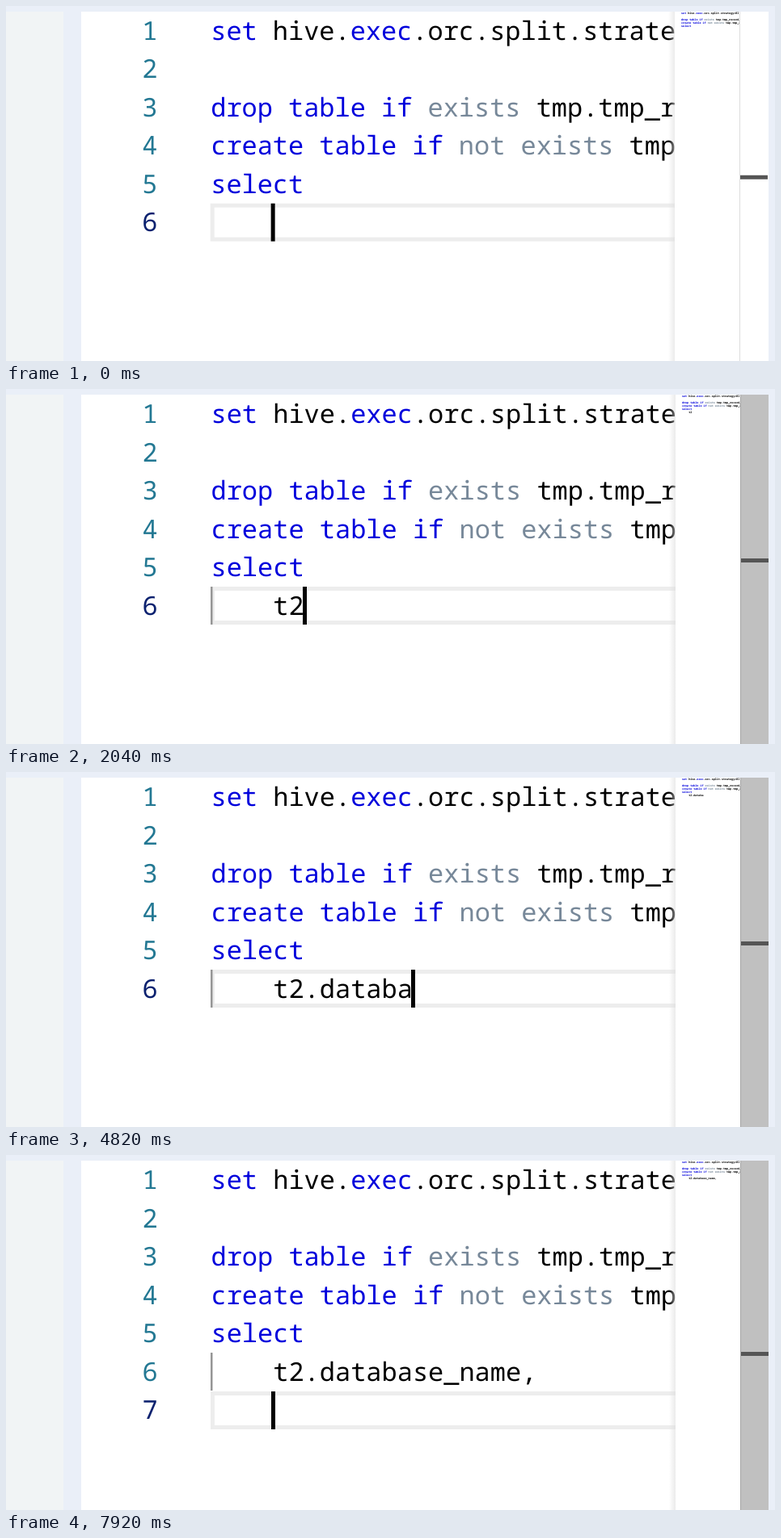
These frames come from a looping animation (951 px wide and 440 px high, 8 s). An HTML page:

```html
<!DOCTYPE html>
<html lang="en">
<head>
<meta charset="utf-8">
<title>SQL editor typing</title>
<style>
  html, body { margin: 0; width: 100%; height: 100%; overflow: hidden; background: #fff; }
  svg { display: block; width: 100%; height: 100%; }
  text { white-space: pre; text-rendering: geometricPrecision; font-family: "Noto Sans Mono", "DejaVu Sans Mono", monospace; }
  .icon { font-family: "Noto Sans", "Open Sans", sans-serif; }
</style>
</head>
<body>
<svg id="stage" viewBox="0 0 951 440" xmlns="http://www.w3.org/2000/svg"></svg>
<script>
const LOOP = 8000;
const CHAR = 19.19, SIZE = CHAR / 0.6, PITCH = 47.55;
const LEFT = 253.5, EDGE = 828;
const BLUE = "#0000dc", GREY = "#778899", INK = "#000";
const KEYWORDS = /^(set|exec|drop|table|if|create|select|database)$/;
const OPERATORS = /^(not|exists)$/;

const HEAD = [
  "set hive.exec.orc.split.strategy=BI;",
  "",
  "drop table if exists tmp.tmp_record_info;",
  "create table if not exists tmp.tmp_record_info as",
  "select"
];

// [time, typed characters, caret shown, popup]
const FULL = "t2.database_name,";
const STEPS = [
  [0, 0, 1], [490, 0, 0], [980, 0, 1],
  [1470, 1, 1, "t"], [1890, 2, 1, "t"], [2040, 2, 1], [2450, 2, 0],
  [2780, 3, 1], [3270, 3, 0],
  [3600, 4, 1, "d"], [3760, 5, 1], [3930, 6, 1], [4090, 7, 1], [4590, 7, 0],
  [4740, 8, 1], [4820, 9, 1], [5060, 10, 1], [5220, 11, 1], [5710, 11, 0],
  [5870, 12, 1], [6370, 12, 0],
  [6610, 13, 1], [6690, 14, 1], [6850, 15, 1], [7010, 16, 1], [7510, 16, 0],
  [7590, 17, 1], [7920, 17, 1]
];
const NEWLINE = 7920;
const POPUPS = {
  t: { col: 5, items: ["table", "tmp", "tmp_record_info"] },
  d: { col: 8, items: ["drop"] }
};
const BAR_FADE = [[0, "#ffffff", "#dcdcdc"], [130, "#ececec", "#cccccc"],
  [190, "#d8d8d8", "#b8b8b8"], [260, "#c5c5c5", "#acacac"], [490, "#c0c0c0", "#a6a6a6"]];

const at = (list, t) => list.filter(s => s[0] <= t).pop();
const rect = (x, y, w, h, fill, extra = "") =>
  `<rect x="${x}" y="${y}" width="${w}" height="${h}" fill="${fill}" ${extra}/>`;
const text = (x, y, size, body, extra = "") =>
  `<text x="${x}" y="${y}" font-size="${size}" ${extra}>${body}</text>`;
const paint = line => (line.match(/\w+|\W+/g) || []).map(word => {
  const fill = KEYWORDS.test(word) ? BLUE : OPERATORS.test(word) ? GREY : INK;
  return `<tspan fill="${fill}">${word}</tspan>`;
}).join("");
const lineTop = row => Math.round(245 + (row - 5) * PITCH);

function popup(key) {
  const { col, items } = POPUPS[key];
  const x = Math.round(LEFT + col * CHAR + 2), h = 48;
  const rows = items.map((item, i) => {
    const y = 294 + i * h, picked = i === 0;
    const match = `<tspan font-weight="bold" fill="${picked ? "#bbe7ff" : "#0066bf"}">${item[0]}</tspan>`;
    const fill = `fill="${picked ? "#fff" : "#333"}"`;
    return (picked ? rect(x + 1, y, 951 - x, h, "#0060c0") : "") +
      text(x + 8, y + 32, 24, "abc", `class="icon" letter-spacing="-1.2" ${fill}`) +
      text(x + 55.5, y + 35, SIZE, match + item.slice(1), fill);
  });
  return rect(x, 293, 960 - x, items.length * h + 3, "#c3cad2") +
    rect(x + 1, 294, 960 - x, items.length * h, "#f3f3f3") + rows.join("");
}

function draw(t) {
  const [, typed, caret, menu] = at(STEPS, t);
  const [, bar, barEdge] = at(BAR_FADE, t);
  const lines = [...HEAD, "    " + FULL.slice(0, typed)];
  const broke = t >= NEWLINE;
  if (broke) lines.push("    ");
  const active = lines.length - 1, top = lineTop(active);
  const caretX = Math.round(LEFT + lines[active].length * CHAR - 2);

  const numbers = lines.map((_, i) =>
    text(168.5, 42 + i * PITCH, SIZE, i + 1, `fill="${i === active ? "#0b216f" : "#237893"}"`)).join("");
  const code = lines.map((s, i) => text(LEFT, 42 + i * PITCH, SIZE, paint(s))).join("");
  const mini = lines.map((s, i) =>
    text(836, 10.4 + i * 3.95, 3.4, paint(s), 'font-weight="bold"')).join("");
  const box = rect(255.5, top + 2.5, 600, 42, "none", 'stroke="#ededed" stroke-width="5"');
  const guide = typed ? rect(253, 245, 2.5, 47, "#969696") : "";
  // the view settles from a very slight zoom-out
  const zoom = t < 130 ? 'transform="scale(.9989)"' : "";

  return rect(0, 0, 951, 440, "#eaeff8") + rect(0, 7, 71, 440, "#f1f4f5") +
    rect(93, 7, 850, 433, "#fff") +
    `<g ${zoom}>${numbers}<g clip-path="url(#codeClip)">${box}${guide}${code}` +
    (caret ? rect(caretX, top, 5, 47, "#000") : "") + "</g>" +
    rect(820, 7, 8, 434, "url(#shade)") + rect(828, 7, 80, 434, "#fff") +
    `<g clip-path="url(#miniClip)">${mini}</g>` +
    rect(908, 7, 35, 434, bar) + rect(908, 7, 1, 434, barEdge) +
    rect(909, broke ? 244 : 210, 34, 5, "#555") + "</g>" +
    (menu ? popup(menu) : "");
}

const stage = document.getElementById("stage");
stage.innerHTML = `<defs>
  <clipPath id="codeClip"><rect x="240" y="7" width="${EDGE - 240}" height="434"/></clipPath>
  <clipPath id="miniClip"><rect x="828" y="7" width="80" height="434"/></clipPath>
  <linearGradient id="shade"><stop offset="0" stop-color="#ddd" stop-opacity="0"/>
    <stop offset="1" stop-color="#ddd" stop-opacity=".6"/></linearGradient>
</defs><g id="scene"></g>`;
const scene = document.getElementById("scene");
const start = performance.now();
let last = "";

function tick() {
  const next = draw((performance.now() - start) % LOOP);
  if (next !== last) scene.innerHTML = last = next;
  requestAnimationFrame(tick);
}
tick();
</script>
</body>
</html>
```
